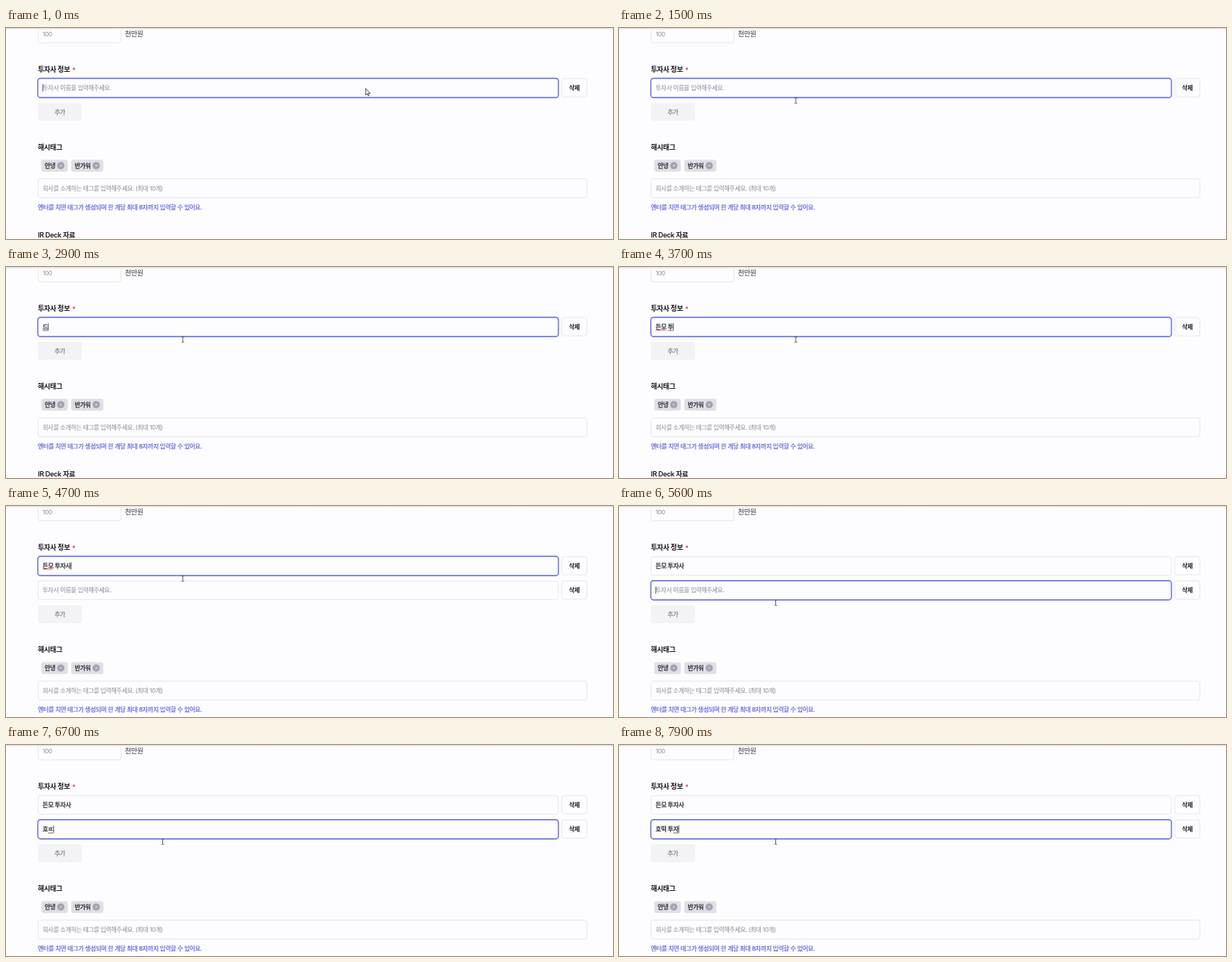
Write an HTML page that moves like this. It is 800 by 279 pixels and loops after 8000 ms.

```html
<!DOCTYPE html>
<html lang="ko">
<head>
<meta charset="utf-8">
<title>투자사 정보</title>
<style>
html, body { margin: 0; width: 100%; height: 100%; overflow: hidden; background: #fdfcfe; }
svg { display: block; width: 800px; height: 279px; }
text {
  font: 400 8px Inter, "Noto Sans CJK KR", "Noto Sans CJK", sans-serif;
  letter-spacing: -.04em; white-space: pre;
  color: #9697a5; fill: currentColor; stroke: currentColor; stroke-width: .1;
}
.label { font-size: 9.1px; font-weight: 600; color: #1b1b22; stroke: none; letter-spacing: -.035em; }
.unit { font-size: 9.1px; color: #4c4d57; }
.btn { font-weight: 600; color: #1f1f27; stroke: none; text-anchor: middle; }
.add { color: #7d7d87; stroke-width: .2; text-anchor: middle; }
.tag, .typed { font-weight: 500; color: #1f1f27; stroke-width: .25; letter-spacing: -.035em; }
.hint { color: #5054dc; stroke-width: .15; }
.box { fill: none; stroke: #e5e5ec; stroke-width: .9; }
.ring { fill: none; stroke: #636add; stroke-width: 1.35; }
.caret { fill: #333; }
.under { fill: #33333b; }
.wave { fill: none; stroke: #e0483e; stroke-width: .8; }
</style>
</head>
<body>
<svg viewBox="0 0 800 279">
  <defs>
    <linearGradient id="shade" x2="0" y2="1">
      <stop stop-color="#dcdcdc"/><stop offset="1" stop-color="#fdfcfe"/>
    </linearGradient>
    <g id="row">
      <rect class="box" x="42.3" y="66.9" width="685.4" height="24.6" rx="3"/>
      <rect class="box" x="732.6" y="66.9" width="33" height="24.1" rx="3"/>
      <text class="btn" x="749" y="81.9">삭제</text>
    </g>
    <g id="remove">
      <circle r="4.8" fill="#a3a4b3"/>
      <path d="M-1.1-1.1 1.1 1.1M1.1-1.1-1.1 1.1" stroke="#f0f0f5" stroke-width=".7"/>
    </g>
  </defs>

  <rect class="box" x="42.3" y="-6" width="109.4" height="25.7" rx="3"/>
  <text x="48.3" y="10.5">100</text>
  <text class="unit" x="156.7" y="10.9">천만원</text>
  <rect width="800" height="2.6" fill="url(#shade)"/>

  <text class="label" x="42" y="58.3">투자사 정보</text>
  <text class="label" x="87" y="59" style="color:#e0474c">*</text>

  <use href="#row"/>
  <use href="#row" id="second" y="32.2"/>

  <g id="below">
    <rect x="42" y="99" width="58" height="23.8" rx="3" fill="#f3f2f6"/>
    <text class="add" x="71" y="114">추가</text>
    <text class="label" x="42" y="160.8">해시태그</text>
    <rect x="46.5" y="174.2" width="35" height="15.8" rx="3" fill="#dfdfe5"/>
    <text class="tag" x="51" y="185">안녕</text>
    <use href="#remove" x="72.2" y="182"/>
    <rect x="86" y="174.2" width="42.3" height="15.8" rx="3" fill="#dfdfe5"/>
    <text class="tag" x="90.4" y="185">반가워</text>
    <use href="#remove" x="118.9" y="182"/>
    <rect class="box" x="42.3" y="199.3" width="723.3" height="25.2" rx="3"/>
    <text x="48.3" y="215">회사를 소개하는 태그를 입력해주세요. (최대 10개)</text>
    <text class="hint" x="42" y="239.8">엔터를 치면 태그가 생성되며 한 개당 최대 8자까지 입력할 수 있어요.</text>
    <text class="label" x="42" y="276.6">IR Deck 자료</text>
  </g>

  <rect class="ring" id="ring" x="41.9" y="66.5" width="686.2" height="25.5" rx="3.6"/>
  <g id="fields"></g>

  <path id="arrow" d="M0 0V8.6L2 6.9 3.3 9.8 4.6 9.2 3.3 6.4H5.9Z" fill="#fff" stroke="#222" stroke-width=".8" stroke-linejoin="round"/>
  <path id="beam" d="M-1.7-3.5Q0-3.5 0-2.6 0-3.5 1.7-3.5M0-2.6V2.6M-1.7 3.5Q0 3.5 0 2.6 0 3.5 1.7 3.5" fill="none" stroke="#4a4a50" stroke-width=".9"/>
</svg>
<script>
const LOOP = 8000, TICK = 100, ROW = 32.2, LEFT = 48.3;
const ADDED = 4600, MOVED = 5400, OVER_TEXT = 1100;
const $ = id => document.getElementById(id);

// [time, text]; the last syllable is being composed unless "done"
const typing = [
  [[0, ''], [2900, '드'], [3100, '든'], [3200, '든ㅁ'], [3300, '든모'], [3500, '든모 '],
   [3600, '든모 ㅌ'], [3700, '든모 투'], [3900, '든모 툊'], [4000, '든모 투자'],
   [4100, '든모 투잣'], [4200, '든모 투자사'], [4300, '든모 투자사', 'done']],
  [[0, ''], [6400, 'ㅎ'], [6500, '호'], [6700, '호ㄸ'], [6800, '호떠'], [7000, '호떡'],
   [7200, '호떡 '], [7300, '호떡 ㅌ'], [7400, '호떡 투'], [7800, '호떡 툊'], [7900, '호떡 투자']]
];
// times at which the caret turns off, on, off, ...
const blinks = [500, 1100, 1500, 2100, 2600, 2900, 5100, MOVED, 5900, 6300];
// [time, x, y]: the pointer jumps from place to place
const pointer = [[0, 474, 80], [100, 455, 72], [200, 330, 57], [300, 150, 110], [400, 44, 190],
  [500, 70, 228], [700, 169, 123], [900, 191, 122.5], [OVER_TEXT, 233, 96],
  [5300, 218, 110], [5400, 209, 121], [5500, 206.5, 128]];

const at = (steps, t) => steps.findLast(s => s[0] <= t);
const caretOn = t => blinks.filter(b => b <= t).length % 2 === 0;

function add(parent, tag, attrs) {
  const el = document.createElementNS('http://www.w3.org/2000/svg', tag);
  for (const k in attrs) el.setAttribute(k, attrs[k]);
  return parent.appendChild(el);
}
const show = (el, on) => el.style.display = on ? '' : 'none';

const fields = typing.map((steps, i) => {
  const g = add($('fields'), 'g', { transform: `translate(0 ${i * ROW})` });
  const hint = add(g, 'text', { x: LEFT, y: 82 });
  hint.textContent = '투자사 이름을 입력해주세요.';
  return {
    g, steps, hint,
    value: add(g, 'text', { class: 'typed', x: LEFT, y: 82 }),
    under: add(g, 'rect', { class: 'under', y: 83.6, height: .7 }),
    wave: add(g, 'path', { class: 'wave' }),
    caret: add(g, 'rect', { class: 'caret', y: 74.3, width: .8, height: 9.6 })
  };
});

function zigzag(width) {
  let d = `M${LEFT} 84`;
  for (let x = 1.2, up = true; x <= width; x += 1.2, up = !up) d += `L${LEFT + x} ${up ? 83 : 84.2}`;
  return d;
}

function drawField(f, i, t, focused) {
  const [, text, done] = at(f.steps, t);
  f.value.textContent = text;
  show(f.hint, !text);
  const width = text ? f.value.getComputedTextLength() : 0;
  const composing = focused && text && !done && !text.endsWith(' ');
  show(f.under, composing);
  if (composing) {
    const last = f.value.getSubStringLength(text.length - 1, 1);
    f.under.setAttribute('x', LEFT + width - last);
    f.under.setAttribute('width', last);
  }
  const misspelt = i === 0 && focused && text.includes(' ');
  show(f.wave, misspelt);
  if (misspelt) f.wave.setAttribute('d', zigzag(f.value.getSubStringLength(0, 2)));
  show(f.caret, focused && caretOn(t));
  f.caret.setAttribute('x', LEFT + width);
}

function draw(t) {
  const added = t >= ADDED, active = t >= MOVED ? 1 : 0;
  show($('second'), added);
  show(fields[1].g, added);
  $('below').setAttribute('transform', `translate(0 ${added ? ROW : 0})`);
  $('ring').setAttribute('transform', `translate(0 ${active * ROW})`);
  fields.forEach((f, i) => drawField(f, i, t, i === active));
  const [, x, y] = at(pointer, t);
  for (const id of ['arrow', 'beam']) $(id).setAttribute('transform', `translate(${x} ${y})`);
  show($('arrow'), t < OVER_TEXT);
  show($('beam'), t >= OVER_TEXT);
}

let start;
function tick(now) {
  start ??= now;
  const t = (now - start) % LOOP;
  draw(t - t % TICK);
  requestAnimationFrame(tick);
}
draw(0);
requestAnimationFrame(tick);
</script>
</body>
</html>
```
